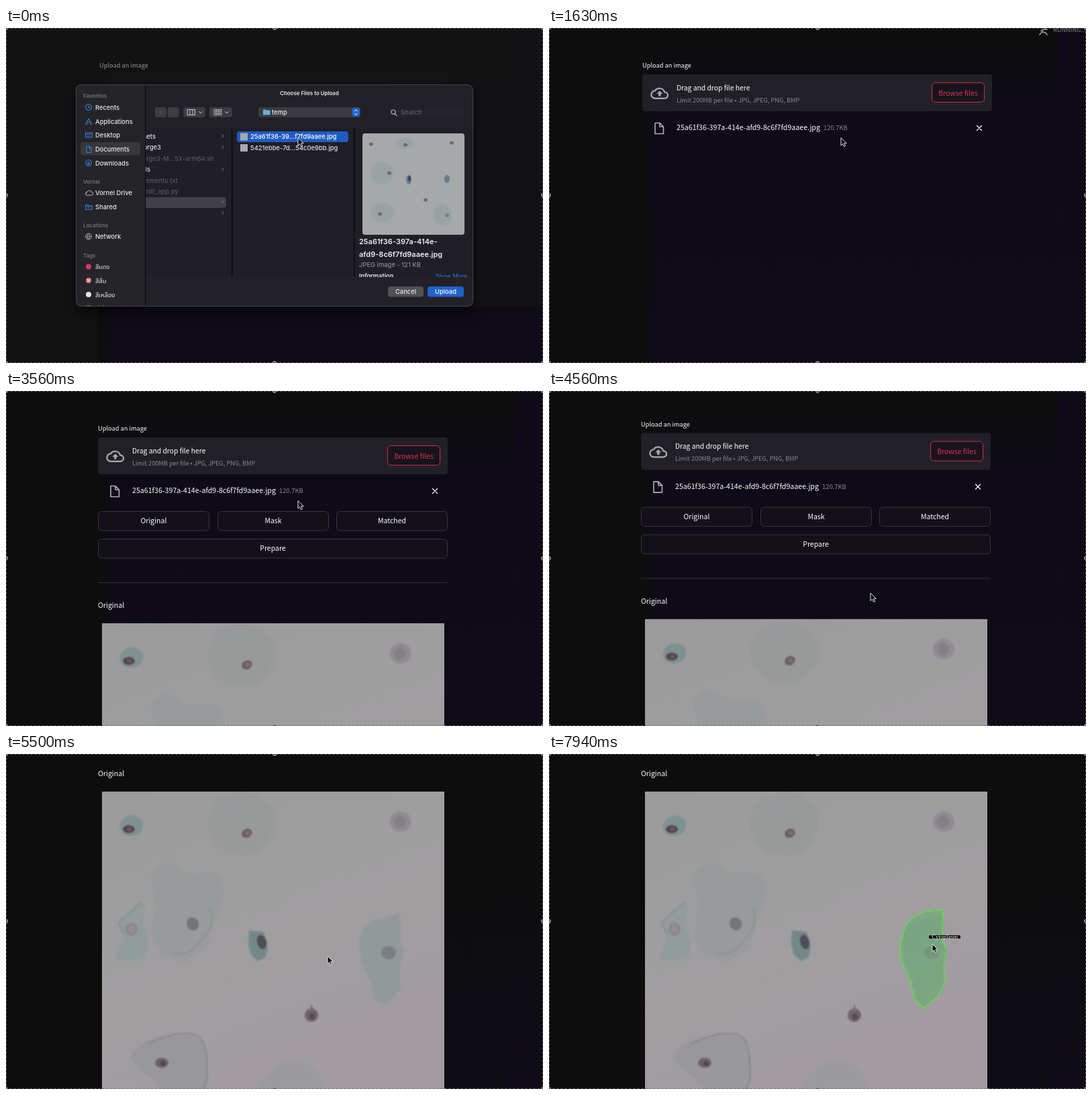
An HTML page for the animation above (8 s loop, 800 by 499 pixels).

```html
<!DOCTYPE html>
<html lang="en">
<head>
<meta charset="utf-8">
<title>Image upload</title>
<style>
  html, body { margin: 0; width: 100%; height: 100%; overflow: hidden; background: #0d0d0e; }
  svg { display: block; width: 800px; height: 499px; }
  text { white-space: pre; }
  .app { font-family: "Noto Sans CJK JP", "Noto Sans CJK SC", "Noto Sans CJK KR", "Noto Sans CJK TC", "Noto Sans", sans-serif; font-weight: 500; }
  .sys { font-family: Inter, "Noto Sans Thai", "Noto Sans", sans-serif; font-weight: 500; }
  .tag { font-family: "Liberation Serif", serif; }
</style>
</head>
<body>
<svg id="stage" viewBox="0 0 800 499"></svg>
<script>
const LOOP = 8000;
const stage = document.getElementById('stage');

const rect = (x, y, w, h, fill, rx = 0, more = '') =>
  `<rect x="${x}" y="${y}" width="${w}" height="${h}" rx="${rx}" fill="${fill}" ${more}/>`;
const text = (x, y, size, fill, str, more = '') =>
  `<text x="${x}" y="${y}" font-size="${size}" fill="${fill}" ${more}>${str}</text>`;
const blob = (x, y, rx, ry, fill, opacity = 1, more = '') =>
  `<ellipse cx="${x}" cy="${y}" rx="${rx}" ry="${ry}" fill="${fill}" opacity="${opacity}" ${more}/>`;
const path = (d, fill, more = '') => `<path d="${d}" fill="${fill}" ${more}/>`;
const line = (d, stroke, width = 1, more = '') =>
  path(d, 'none', `stroke="${stroke}" stroke-width="${width}" stroke-linecap="round" stroke-linejoin="round" ${more}`);
const group = (id, body, more = '') => `<g id="${id}" ${more}>${body}</g>`;
const middle = 'text-anchor="middle"';

const defs = `<defs>
  <linearGradient id="slide" x1="0" y1="0" x2=".4" y2="1">
    <stop offset="0" stop-color="#9c9b9c"/><stop offset=".5" stop-color="#a09ea0"/><stop offset="1" stop-color="#a39ba1"/>
  </linearGradient>
  <linearGradient id="violet" x1="0" y1="0" x2="0" y2="1">
    <stop offset="0" stop-color="#0e0a17" stop-opacity="0"/><stop offset=".2" stop-color="#0e0a17"/><stop offset="1" stop-color="#0f0b18"/>
  </linearGradient>
  <radialGradient id="corner" cx="1" cy="1" r=".6">
    <stop offset="0" stop-color="#100c18"/><stop offset="1" stop-color="#100c18" stop-opacity="0"/>
  </radialGradient>
  <filter id="soft" x="-20%" y="-20%" width="140%" height="140%"><feGaussianBlur stdDeviation="1.1"/></filter>
  <filter id="shade" x="-10%" y="-10%" width="120%" height="125%"><feGaussianBlur stdDeviation="8"/></filter>
  <clipPath id="photoClip"><rect x="143" y="346" width="510" height="510"/></clipPath>
  <clipPath id="panelClip"><rect x="104" y="84" width="592" height="331" rx="8"/></clipPath>
  <clipPath id="columnClip"><rect x="208" y="148" width="488" height="223"/></clipPath>
</defs>`;

// Page
const cloud = 'M6 19a5 5 0 0 1-.1-10a7 7 0 0 1 12.600 2a4 4 0 0 1 .5 8z';
const dropzone = rect(137, 69, 521, 55, '#222027', 4) +
  `<g transform="translate(149.300 83.300) scale(1.130)">${line(cloud, '#aaa9ad', 2)}${path('M8 13h2.500v3h3v-3h2.500l-4-4z', '#aaa9ad')}</g>` +
  text(188, 92.500, 10.300, '#fff', 'Drag and drop file here') +
  text(188, 110.500, 9.200, '#8a888f', 'Limit 200MB per file • JPG, JPEG, PNG, BMP') +
  rect(568.5, 81.5, 78, 29, '#18141e', 5, 'stroke="#cf2d47"') +
  text(607.5, 100.500, 10.500, '#dc324e', 'Browse files', middle);

const fileRow =
  line('M156 141.500h7l5.500 5.500v10.500h-12.500zM163 141.500v5.500h5.500', '#b0afb3', 1.6) +
  text(188, 152, 10.650, '#fff', '25a61f36-397a-414e-afd9-8c6f7fd9aaee.jpg') +
  text(407, 152, 9.400, '#8a888f', '120.7KB') +
  line('M635.500 145.500l7 7m0-7l-7 7', '#f0f0f2', 1.4);

const button = (x, y, w, label, id = '') =>
  rect(x + .5, y + .5, w - 1, 28.5, '#131019', 5, `id="${id}" stroke="#37343f"`) +
  text(x + w / 2, y + 18.300, 10.500, '#fff', label, middle);

const controls = button(137, 179, 166, 'Original') + button(315, 179, 166, 'Mask', 'mask') +
  button(492, 179, 166, 'Matched') + button(137, 220, 521, 'Prepare', 'prepare') +
  rect(137, 285, 521, 1, '#33303a') + text(137, 323, 10.600, '#fff', 'Original');

// Specimen slide, laid out at the scrolled position
const rightCell = 'M586 236L588 262L586 276L592 292L586 330L588 350L566 374L548 366L544 340L530 312L526 280L532 258L550 246L566 244Z';
const cells =
  blob(351, 104, 51, 47, '#929696', .42) + line('M322 82q14 8 34 4m32 8l-2 34m-70-8q20 20 48 18', '#86898b', 1, 'opacity=".4"') +
  blob(359, 118, 8, 6.5, '#66525a', .9, 'transform="rotate(-25 359 118)"') + blob(360, 118, 4.5, 3.5, '#806a74') +
  blob(187, 107, 17.5, 15, '#76908f', .8, 'transform="rotate(-15 187 107)"') + blob(183, 112, 9, 6, '#51434f') + blob(184, 112, 4, 3, '#735560') +
  blob(588, 101, 16, 15, '#8b868e', .75) + blob(587, 101, 9, 9, '#7d7983', .7) +
  path('M201 221L208 224L204 250L212 282L206 306L162 308L176 272L167 252Z', '#879c98', 'opacity=".48"') +
  line('M201 221L168 251L176 270', '#6f8985', 1.3, 'opacity=".7"') +
  blob(187, 261, 9, 10, '#88828a', .8) + blob(187, 261, 5, 6, '#988f96', .8) +
  path('M216 180Q228 158 246 163L270 178L306 176Q326 184 325 210L312 246L297 290L264 312L230 298L216 270L222 226Z', '#8f9998', 'opacity=".42"') +
  line('M303 229q12 24-14 50q-14 22-40 18', '#789086', 1.8, 'opacity=".6"') + line('M238 216q30 14 66-6', '#858d8c', 1, 'opacity=".4"') +
  blob(278, 253, 9, 10, '#736b75', .85, 'transform="rotate(-30 278 253)"') +
  path('M362 263L384 265L390 290L386 304L375 308L365 299L361 285Z', '#6d8783', 'opacity=".88"') + blob(381, 280, 7, 11, '#4d4653', .9, 'transform="rotate(-15 381 280)"') +
  path(rightCell, '#859894', 'opacity=".55"') + blob(570, 296, 11, 10, '#77777f', .8) +
  blob(455, 389, 10, 10, '#6a6068', .95) + blob(456, 391, 4.5, 4.5, '#564a55') + path('M452 382l3-9l4 9z', '#777078') +
  path('M184 452Q202 424 236 420Q266 410 286 421Q301 436 300 462Q304 492 286 510H234Q226 486 206 476Z', '#909494', 'opacity=".5"') +
  line('M212 432Q270 405 290 423Q301 440 299 470Q303 488 292 500', '#777f80', 1.6, 'opacity=".7"') +
  blob(232, 460, 10, 7.5, '#685d67', .95) + blob(234, 461, 4, 3.5, '#50454f') +
  path('M374 499Q400 456 428 457Q466 456 474 499L460 530H390Z', '#929999', 'opacity=".38"');

const outline = 'M587 232L586 278L592 290L588 318L590 338L580 360L558 379L545 366L538 338L524 306L523 284L530 258L542 243L562 234Z';
const photo = rect(143, 346, 510, 510, 'url(#slide)') +
  `<g transform="translate(0 290)"><g filter="url(#soft)">${cells}</g>` +
  group('highlight', path(outline, '#6bb06f', 'fill-opacity=".55" stroke="#62d84c" stroke-width="1.8" stroke-linejoin="round"') +
    path(outline, 'none', 'stroke="#86a984" stroke-width="2" stroke-dasharray="2 13"')) + '</g>';

// File chooser
const icons = {
  clock: 'M4 0a4.500 4.500 0 1 0 .1 0M4 2v3h2.500',
  app: 'M0 8.500L4 .5L8 8.500M1.500 5.800h5.500M-1 8.500h3m4 0h3',
  desk: 'M-.5 1h10v7h-10zM-.5 3h10M2 6h5',
  doc: 'M1 0h4l3 3v6.500h-7zM5 0v3h3',
  down: 'M4 0a4.500 4.500 0 1 0 .1 0M4 2.500v4.500M2 5l2 2l2-2',
  cloud: 'M2 8a2.300 2.300 0 0 1 0-4.600a3.300 3.300 0 0 1 6-.4a2.600 2.600 0 0 1 1 5z',
  share: 'M-.5 8.500v-7h4l1 1.500h5v5.500zM-.5 3.500h10M3 6h3',
  globe: 'M4 0a4.500 4.500 0 1 0 .1 0M0 4.500h8M4 0q-3.500 4.500 0 9q3.500-4.500 0-9'
};
const place = (y, icon, label, color = '#2f7fdc') =>
  `<g transform="translate(119 ${y - 4.500})">${line(icons[icon], color, 1.1)}</g>` + text(133, y + 3.500, 9.400, '#e9e9eb', label);
const heading = (y, label) => text(115, y + 3, 7.900, '#727177', label, 'font-weight="600"');
const tag = (y, color, label) => blob(123, y, 4, 4, color) + text(133, y + 3.500, 9.400, '#e9e9eb', label);

const sidebar = rect(104, 84, 104, 331, '#252429') + rect(111, 170, 89, 19.5, '#38373c', 4) +
  heading(101, 'Favorites') + place(118, 'clock', 'Recents') + place(139, 'app', 'Applications') +
  place(159.5, 'desk', 'Desktop') + place(180.5, 'doc', 'Documents') + place(201, 'down', 'Downloads') +
  heading(229, 'Vornel') + place(245.5, 'cloud', 'Vornel Drive', '#a9a9ad') + place(266.5, 'share', 'Shared') +
  heading(294, 'Locations') + place(310.5, 'globe', 'Network', '#8b8b90') +
  heading(338.5, 'Tags') + tag(355.5, '#e3365a', 'สีแดง') + tag(376, '#d87a78', 'สีส้ม') +
  line('M121 374l4 4m0-4l-4 4', '#f0d8d4', 1) + tag(397, '#e9e6da', 'สีเหลือง') + tag(417, '#4fb46b', 'สีเขียว') +
  rect(207, 84, 1.2, 331, '#0d0c10');

const entry = (y, end, label, color = '#e4e4e7') => text(end, y + 3.5, 9.400, color, label, 'text-anchor="end"');
const chevron = (x, y) => line(`M${x} ${y - 2}l2 2l-2 2`, '#85848a', 1);
const columns = rect(208, 148, 488, 223, '#201e26') + rect(200, 252, 128, 16, '#414046', 4) +
  entry(161, 223, 'assets') + entry(177.5, 231, 'miniforge3') + entry(194, 310, 'Miniforge3-M...5X-arm64.sh', '#58575d') +
  entry(210.5, 215, 'models') + entry(227, 256, 'requirements.txt', '#58575d') + entry(243, 257, 'streamlit_app.py', '#58575d') +
  [161, 177.5, 210.5, 259, 275.5].map(y => chevron(322, y)).join('') +
  rect(336, 148, 1.5, 223, '#0c0b0f') + rect(518, 148, 1.5, 223, '#0c0b0f') +
  rect(344, 154, 166, 16, '#1f5cc2', 4) + rect(349, 156.5, 11, 11, '#a5aaaa') + rect(349, 173, 11, 11, '#a5aaaa') +
  text(364, 165, 9.400, '#fff', '25a61f36-39...f7fd9aaee.jpg') + text(364, 181.500, 9.400, '#e4e4e7', '5421ebbe-7d...54c0e9bb.jpg') +
  rect(531, 157, 152, 151, '#a5a9a9', 4) +
  [[560, 216, 17, 17], [561, 275, 18, 14], [650, 278, 14, 17], [594, 172, 13, 9]].map(c => blob(...c, '#87999b', .35, 'filter="url(#soft)"')).join('') +
  [[544, 173], [595, 174], [664, 171], [571, 216], [625, 256], [557, 277]].map(([x, y]) => blob(x, y, 3, 2.6, '#755f6d', .9)).join('') +
  blob(600, 226, 4, 7, '#657f90') + blob(601, 224, 2, 4, '#3c405c') + blob(657, 225, 4, 6, '#657f90') + blob(657, 279, 3, 3, '#7b8288') +
  text(526, 322, 11, '#ececee', '25a61f36-397a-414e-', 'font-weight="600"') + text(526, 341, 11, '#ececee', 'afd9-8c6f7fd9aaee.jpg', 'font-weight="600"') +
  text(526, 355.500, 9.400, '#8d8c92', 'JPEG image - 121 KB') +
  text(526, 373, 9.200, '#ececee', 'Information', 'font-weight="600"') + text(687, 373, 8.700, '#2c6fd2', 'Show More', 'text-anchor="end"');

const grid = [0, 1].map(r => [0, 1, 2].map(c => rect(310 + c * 4, 121.5 + r * 5, 3, 3, 'none', 0, 'stroke="#c9c9cc" stroke-width=".8"')).join('')).join('');
const toolbar = text(452, 100, 7.900, '#e9e9eb', 'Choose Files to Upload', middle + ' font-weight="600"') +
  rect(222, 118, 17, 15, '#3d3c41', 3) + rect(240.5, 118, 17, 15, '#3d3c41', 3) +
  line('M232 123l-2.500 2.500l2.500 2.500M248 123l2.500 2.500l-2.500 2.500', '#59585d') +
  rect(264, 118, 33, 15, '#3d3c41', 4) + line('M270.500 121.500h11v8h-11zM274 121.500v8M278 121.500v8M287.500 124.500l2.500 2.500l2.500-2.500', '#c9c9cc') +
  rect(303, 118, 34, 15, '#3d3c41', 4) + grid + line('M326.500 124.500l2.500 2.500l2.500-2.500', '#c9c9cc') +
  rect(376, 118, 152, 15, '#3c3a40', 4) + path('M383 121.500h4l1 1h5.500v7h-10.500z', '#63aee6') + text(396, 129, 9.400, '#ececee', 'temp') +
  rect(515.5, 119, 11.5, 13, '#1f62cd', 3.5) + line('M519 124l2.300-2.500l2.300 2.500m-4.600 3l2.300 2.500l2.300-2.500', '#fff') +
  rect(569, 118, 113, 15, '#252329', 4) + line('M577 122a3.200 3.200 0 1 0 .1 0M579.500 128l2.800 2.800', '#b9b9bd', 1.2) + text(588, 129.200, 9.400, '#615f66', 'Search');

const panel = rect(104, 92, 592, 335, '#000', 8, 'opacity=".45" filter="url(#shade)"') +
  `<g clip-path="url(#panelClip)">${rect(104, 84, 592, 331, '#232128')}${toolbar}
   <g clip-path="url(#columnClip)">${columns}</g>${sidebar}</g>` +
  rect(569, 385, 53, 15.5, '#515055', 4) + text(595.5, 396.300, 9.400, '#ececee', 'Cancel', middle) +
  rect(628, 385, 54, 15.5, '#1f62cd', 4) + text(655, 396.300, 9.400, '#fff', 'Upload', middle) +
  rect(104.5, 84.5, 591, 330, 'none', 8, 'stroke="#454349"');

const handles = [[0, 0], [400, 0], [800, 0], [0, 249], [800, 249], [0, 499], [400, 499], [800, 499]]
  .map(([x, y]) => blob(x, y, 2.6, 2.6, '#5c5c5e', 1, 'stroke="#a3a3a5"')).join('');

// The dimming leaves out the area behind the file chooser
const veil = path('M0 0H800V415H137V499H0ZM137 125V415H695V125Z', '#151515', 'fill-rule="evenodd"');

stage.innerHTML = defs + rect(0, 0, 800, 499, '#0d0d0e') +
  group('early', rect(150, 30, 650, 469, 'url(#violet)') + rect(757, 0, 43, 125, '#0e0a17')) +
  group('late', rect(0, 0, 800, 499, 'url(#corner)')) + group('veil', veil) +
  group('page', text(137, 59, 9.250, '#fff', 'Upload an image', 'id="label"') + group('dropzone', dropzone) + group('fileRow', fileRow) +
    group('results', controls + `<g clip-path="url(#photoClip)">${photo}</g>`), 'class="app"') +
  group('running', line('', '#85858a', 1.9, 'id="runner"') + blob(738, -1, 1.7, 1.7, '#85858a') + text(751, 6, 9.200, '#85858a', 'RUNNING...'), 'class="app"') +
  group('panel', panel, 'class="sys"') +
  rect(.5, .5, 799, 498, 'none', 0, 'stroke="#737375" stroke-dasharray="3 3"') + handles +
  group('tip', rect(-5, -13, 47, 5, '#050505', 2) + text(-1, -8, 9, '#fff', 'Cytoplasm'), 'class="tag"') +
  group('cursor', path('M0 0V11.500L2.700 9.100L4.500 13.200L6.500 12.300L4.700 8.300H8.300Z', '#060606', 'stroke="#e6e6e6" stroke-width="1" stroke-linejoin="round"'));

const el = Object.fromEntries([...stage.querySelectorAll('[id]')].map(n => [n.id, n]));
const clamp = v => Math.min(1, Math.max(0, v));
const ease = (t, from, to) => { const p = clamp((t - from) / (to - from)); return p * p * (3 - 2 * p); };
const show = (node, on) => node.setAttribute('opacity', +on);

const cursorStops = [[0, 435, 163.5], [3940, 435, 163.5], [4190, 479, 301], [6940, 479, 301], [7690, 557, 316], [7940, 571, 283]];
function cursorAt(t) {
  let [, x, y] = cursorStops[0];
  for (let i = 1; i < cursorStops.length; i++) {
    const [from, x0, y0] = cursorStops[i - 1], [to, x1, y1] = cursorStops[i];
    const p = ease(t, from, to);
    x += (x1 - x0) * p;
    y += (y1 - y0) * p;
  }
  return [x, y];
}

const strides = [
  'M737 2L734 6L738 8L736 11M734 6L729 8M737 2L732 2L730 5M737 2L741 4',
  'M737 2L735 6L734 11M735 6L738 8L733 9M737 2L734 5M737 2L739 5',
  'M737 2L734 6L731 10M734 6L740 7L742 10M737 2L733 4M737 2L742 2'
];

function render(t) {
  const opened = ease(t, 500, 840);
  show(el.panel, 1 - ease(t, 500, 740));
  show(el.veil, .7 * (1 - ease(t, 800, 1190)));
  show(el.label, .55 + .45 * opened);
  show(el.dropzone, .12 + .88 * opened);
  show(el.fileRow, t >= 1380);
  show(el.running, t >= 1380 && t < 3000);
  el.runner.setAttribute('d', strides[Math.floor(t / 190) % strides.length]);
  show(el.results, t >= 3000);

  const scroll = 290 * ease(t, 4500, 5190);
  el.page.setAttribute('transform', `translate(${t < 3000 ? 2 : 0} ${-scroll})`);
  const settled = ease(t, 4950, 5300);
  show(el.early, 1 - settled);
  show(el.late, settled);

  const [x, y] = cursorAt(t);
  el.cursor.setAttribute('transform', `translate(${x} ${y})`);
  el.tip.setAttribute('transform', `translate(${x} ${y})`);
  const hover = x > 527;
  show(el.highlight, hover);
  show(el.tip, hover);
  const border = (node, over) => node.setAttribute('stroke', over ? '#c32a44' : '#37343f');
  border(el.mask, y > 179 && y < 208);
  border(el.prepare, y > 220 && y < 249);
}

const start = performance.now();
function tick() {
  render((performance.now() - start) % LOOP);
  requestAnimationFrame(tick);
}
tick();
</script>
</body>
</html>
```
